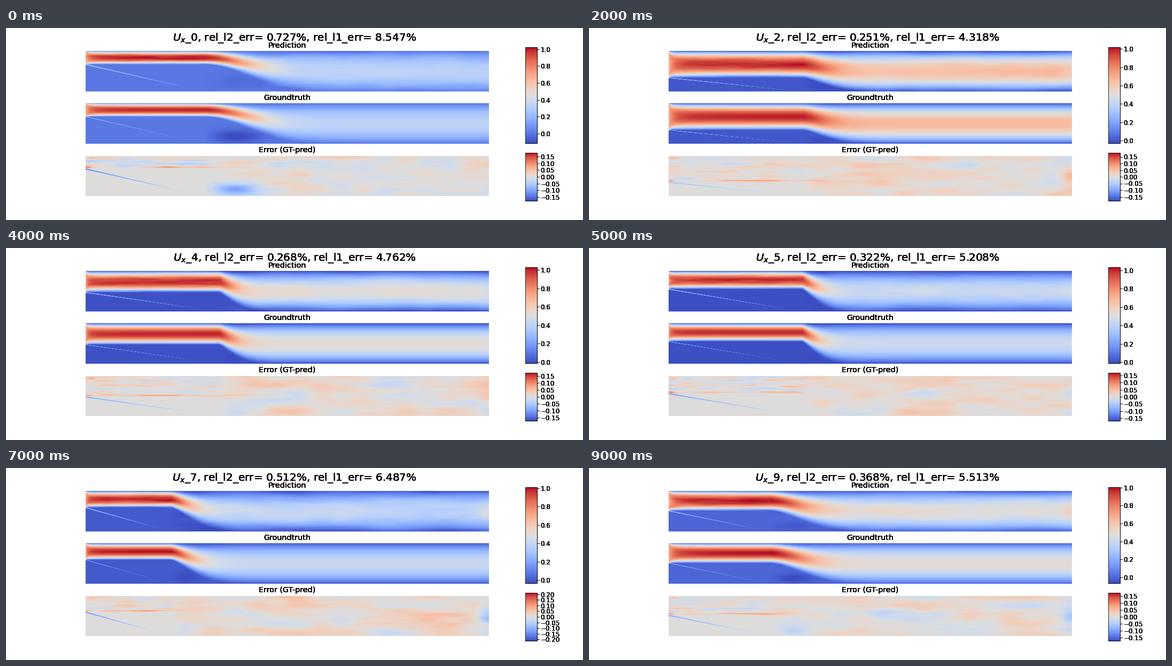
Recreate the animation shown at these times as a matplotlib script. Size 1080 by 360 pixels, loop 10000 ms.

```python
import matplotlib.pyplot as plt
import numpy as np
from matplotlib.animation import FuncAnimation

plt.rcParams["font.family"] = "DejaVu Sans"
plt.rcParams["font.size"] = 12

STAGE_W, STAGE_H = 1080, 360
W, H = 755, 75.5
LEFT, TOP, SPACING = 149, 43.2, 98.15
LAYERS = 6  # stacked text turns its soft edges black

X, Y = np.meshgrid(np.arange(755) + 0.5, (np.arange(76) + 0.5) * H / 76)


class Case:
    """Flow over a backward-facing step; lengths in pixels."""

    def __init__(self, l2, l1, low, high, elim, xc, h, outlet):
        self.l2, self.l1 = l2, l1
        self.low, self.high, self.elim = low, high, elim
        self.xc, self.h, self.outlet = xc, h, outlet
        self.drop = 1 - h / H
        # Stronger backflow goes with a longer jet and a slower inlet.
        self.reach = 22 - 590 * low / np.sqrt(self.drop)
        self.inlet = 4 + 0.55 * (self.reach * h / 1000) ** 3
        self.past = np.maximum(X - xc, 0)
        self.solid = (X < xc) & (Y > h)


# l2 and l1 error, lowest and highest speed, error limit, step corner, outlet
CASES = [
    Case(0.727, 8.547, -0.117, 1.025, 0.1765, 221, 25, 0.0),
    Case(0.223, 4.041, -0.053, 0.998, 0.25, 221, 52, 0.7),
    Case(0.251, 4.318, -0.03, 1.02, 0.18, 250, 50, 0.3),
    Case(0.175, 3.697, -0.0145, 1.026, 0.214, 250, 46, 0.35),
    Case(0.268, 4.762, -0.013, 1.03, 0.175, 250, 40, 0.1),
    Case(0.322, 5.208, -0.0116, 1.035, 0.1687, 250, 34, -0.2),
    Case(0.409, 6.209, -0.104, 0.997, 0.194, 159, 34, -0.4),
    Case(0.512, 6.487, -0.035, 1.01, 0.212, 159, 31, -0.6),
    Case(0.805, 7.402, -0.011, 0.996, 0.237, 159, 27, -0.8),
    Case(0.368, 5.513, -0.065, 1.004, 0.172, 190, 37, -0.5),
]


def bell(x, y, sx, sy):
    return np.exp(-((X - x) / sx) ** 2 - ((Y - y) / sy) ** 2)


def smooth_noise(rng, cell_w, cell_h):
    """Value noise with cells of the given size in pixels."""
    grid = rng.uniform(-1, 1, (int(H / cell_h) + 2, int(W / cell_w) + 2))

    def split(pos):
        cell = pos.astype(int)
        t = pos - cell
        return cell, t * t * (3 - 2 * t)

    (cx, tx), (cy, ty) = split(X / cell_w), split(Y / cell_h)
    upper = grid[cy, cx] * (1 - tx) + grid[cy, cx + 1] * tx
    lower = grid[cy + 1, cx] * (1 - tx) + grid[cy + 1, cx + 1] * tx
    return upper * (1 - ty) + lower * ty


def seam(c, width):
    """Thin tapering line from the step's top left to its bottom right."""
    centre = c.h + (H - c.h) * X / c.xc
    taper = np.clip(1 - X / (0.88 * c.xc), 0, 1)
    line = np.exp(-((Y - centre) / (width * (0.4 + 0.6 * taper))) ** 2)
    return line * taper ** 0.65


def eddy(c):
    shape = bell(c.xc + 0.56 * c.reach, c.h + 0.73 * (H - c.h),
                 0.45 * c.reach, 0.24 * (H - c.h))
    return shape * (1 - np.exp(-c.past / 15))


def flow(c):
    """Plug flow turning parabolic, then a jet spreading behind the step."""
    n = 2 + np.minimum((c.inlet / X) ** 1.2, 60)
    eta = np.clip(np.abs(2 * Y / c.h - 1), 0, 1)
    channel = 2 / 3 * (n + 1) / n * (1 - eta ** n)

    spread = 1 - np.exp(-(c.past / c.reach) ** (1 + c.reach / 95))
    edge = c.h + (H - c.h) * spread
    focus = 9 * c.drop ** 2 * spread * (1 - spread)
    pos = np.clip(Y / edge, 0, 1)
    jet = c.h / edge * (1 + 0.27 * focus) * (4 * pos * (1 - pos)) ** (1 + focus)
    jet += 1.1 * c.low * eddy(c)
    return np.where(X < c.xc, channel, jet) + 0.35 * seam(c, 0.4)


def model_error(c, seed):
    rng = np.random.default_rng(seed)
    patches = 0.05 + 0.16 * smooth_noise(rng, 95, 17)
    patches += 0.1 * smooth_noise(rng, 40, 9) + 0.04 * smooth_noise(rng, 60, 2.5)
    behind = 1 - np.exp(-c.past / 25)
    err = patches * np.where(Y > c.h, behind, 0.3 + 0.7 * behind)

    streaks = smooth_noise(rng, 38, 3) + 0.6 * smooth_noise(rng, 90, 5)
    err += 0.35 * c.drop * streaks * np.exp(-c.past / 12) * (Y < c.h)
    err += 0.4 * bell(c.xc * 0.6, c.h - 3, c.xc * 0.5, 1.4)
    err += 0.5 * bell(4, c.h - 3, 7, 2) + 0.3 * bell(10, 5, 9, 2)
    err += 5 * c.low * eddy(c) + c.outlet * bell(W, 0.5 * H, 20, 17)
    err[c.solid] = 0
    return c.elim * (err - 1.3 * c.drop * seam(c, 1.1) * (X < c.xc))


def add_bar(image, rect, step, digits):
    bar = fig.colorbar(image, cax=fig.add_axes(rect))
    low, high = image.get_clim()
    ticks = step * np.arange(np.ceil(low / step), np.floor(high / step) + 1)
    labels = [f"{round(t, 4) + 0.0:.{digits}f}".replace("-", "\u2212")
              for t in ticks]
    bar.set_ticks(ticks, labels=labels)


def add_panel(row, title, data, low, high):
    bottom = STAGE_H - TOP - row * SPACING - H
    ax = fig.add_axes([LEFT / STAGE_W, bottom / STAGE_H,
                       W / STAGE_W, H / STAGE_H])
    ax.axis("off")
    ax.set_title(title)
    return ax.imshow(data, cmap="coolwarm", vmin=low, vmax=high,
                     aspect="auto", interpolation="nearest")


def draw(i):
    fig.clear()
    c = CASES[i]
    truth, error = flow(c), model_error(c, 40 + i)
    step, digits = (0.05, 2) if c.elim < 0.22 else (0.1, 1)
    heading = (f"$U_x$_{i}, rel_l2_err= {c.l2:.3f}%, "
               f"rel_l1_err= {c.l1:.3f}%")
    for _ in range(LAYERS):
        add_panel(0, "Prediction", truth - error, c.low, c.high)
        field = add_panel(1, "Groundtruth", truth, c.low, c.high)
        diff = add_panel(2, "Error (GT-pred)", error, -c.elim, c.elim)
        add_bar(field, [0.9, 0.4, 0.02, 0.5], 0.2, 1)
        add_bar(diff, [0.9, 0.1, 0.02, 0.25], step, digits)
        fig.text(0.5, 0.98, heading, size=20, ha="center", va="top")
    return fig.axes


fig = plt.figure(figsize=(STAGE_W / 72, STAGE_H / 72), dpi=72)
anim = FuncAnimation(fig, draw, frames=len(CASES), interval=1000, repeat=True)
plt.show()
```
